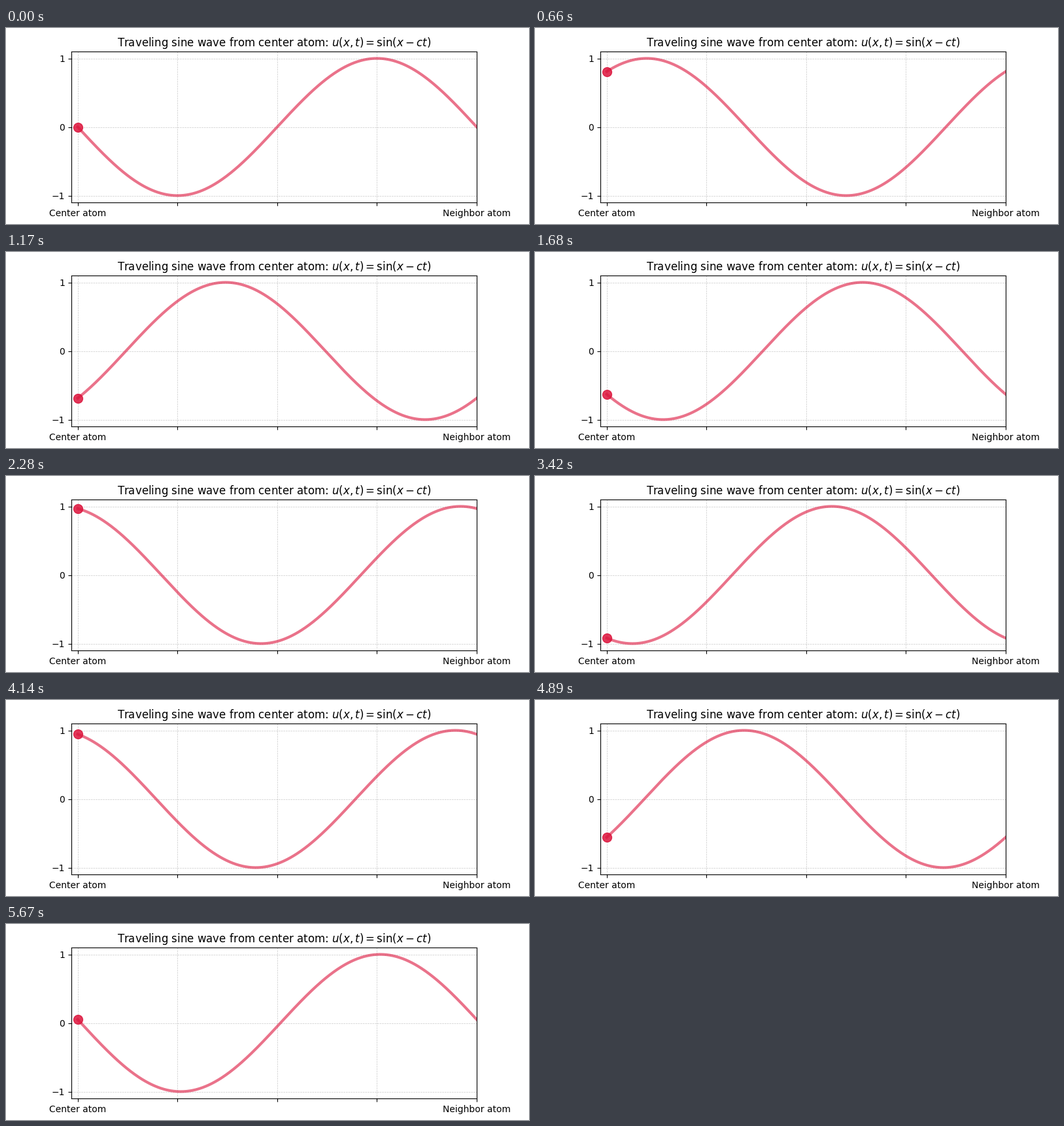
These frames come from a looping animation (800 by 300 pixels, 5.7 s). A matplotlib script:

```python
import numpy as np
import matplotlib.pyplot as plt
from matplotlib.animation import FuncAnimation

FRAMES = 190
INTERVAL = 30
PHASE_STEP = 0.1
COLOR = "crimson"

plt.rcParams["font.family"] = "DejaVu Sans"

x = np.linspace(0, 2 * np.pi, 500)


def wave(pos, phase):
    return -np.sin(pos - phase)


fig, ax = plt.subplots(figsize=(8, 3), dpi=100)
ax.set_xlim(-0.1, 2 * np.pi)
ax.set_ylim(-1.1, 1.1)
ax.set_xticks(np.linspace(0, 2 * np.pi, 5))
ax.set_xticklabels(["Center atom", "", "", "", "Neighbor atom"])
ax.set_yticks([-1, 0, 1])
ax.grid(True, linestyle="--", linewidth=0.5, alpha=0.7)
ax.set_title(r"Traveling sine wave from center atom: $u(x,t) = \sin(x - ct)$")

line, = ax.plot(x, wave(x, 0), color=COLOR, lw=3, alpha=0.6)
atom, = ax.plot([0], [0], "o", color=COLOR, markersize=10, alpha=0.85)


def update(i):
    phase = PHASE_STEP * i
    line.set_ydata(wave(x, phase))
    atom.set_ydata([wave(0, phase)])
    return line, atom


anim = FuncAnimation(fig, update, frames=FRAMES, interval=INTERVAL,
                     repeat=True, repeat_delay=0)
plt.show()
```
